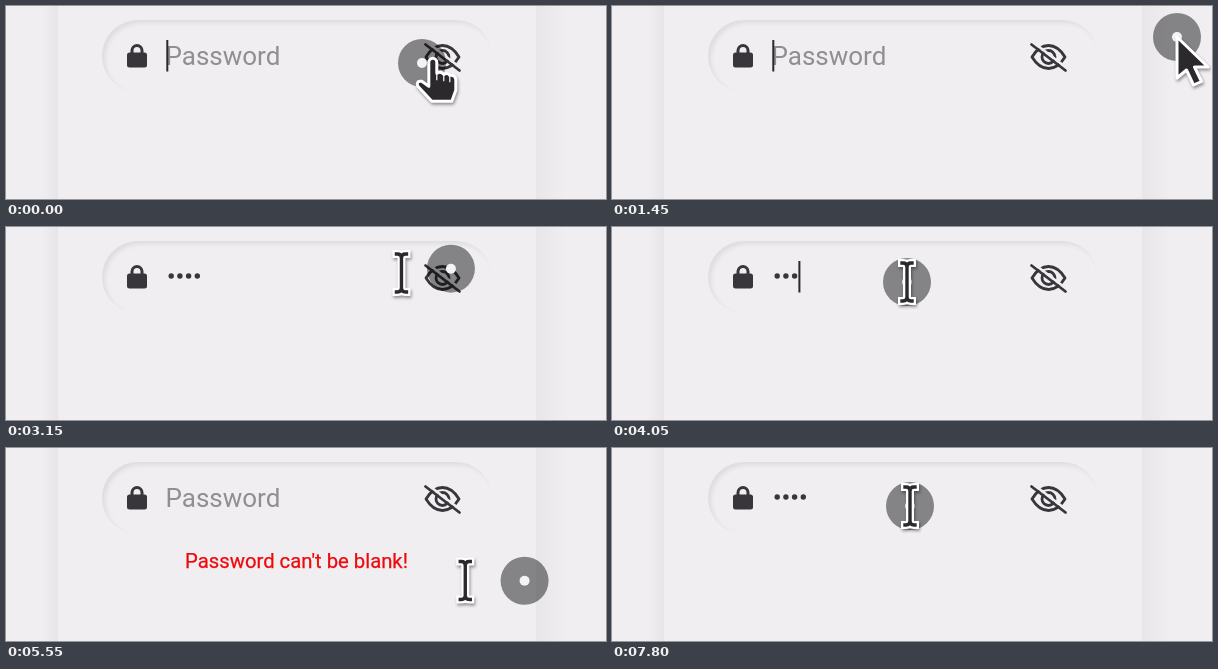
These frames come from a looping animation (600x193 px, 8 s). An HTML page:

```html
<!DOCTYPE html>
<html lang="en">
<head>
<meta charset="utf-8">
<title>Password field</title>
<style>
  html, body { margin: 0; width: 100%; height: 100%; overflow: hidden; background: #f0eef1; }
  #stage { position: relative; width: 600px; height: 193px; overflow: hidden; }
  #stage > * { position: absolute; }
  .edge { top: 0; height: 193px; }
  .left { left: 36px; width: 16px; background: linear-gradient(to right, #e7e5e800, #e7e5e8); }
  .right { left: 530px; width: 30px; background: linear-gradient(to right, #e8e6e9, #e8e6e900); }
  .field {
    left: 96px; top: 14px; width: 390px; height: 72px; border-radius: 36px;
    box-shadow: inset 3px 3px 4px #dedcdf, inset -3px -3px 6px #f1eff2;
  }
  svg { left: 0; top: 0; }
  .roboto { font-family: Roboto, sans-serif; }
  .pointer { filter: drop-shadow(1px 2px 1.5px #0006); }
  .solid { fill: #2b292c; stroke: #fff; stroke-width: 3; stroke-linejoin: round; }
</style>
</head>
<body>
<div id="stage">
  <div class="edge left"></div>
  <div class="edge right"></div>
  <div class="field"></div>
  <svg width="600" height="193" viewBox="0 0 600 193">
    <defs>
      <path id="beamShape" d="M-5-19H-4Q0-19 0-15Q0-19 4-19H5M0-16V16M-5 19H-4Q0 19 0 15Q0 19 4 19H5"/>
    </defs>

    <!-- lock -->
    <g fill="#38353b">
      <rect x="121" y="46.500" width="20" height="15" rx="2.5"/>
      <path d="M126 48V44.500a5 5 0 0 1 10 0V48" fill="none" stroke="#38353b" stroke-width="3"/>
    </g>
    <!-- crossed-out eye -->
    <g fill="none" stroke="#38353b" stroke-width="2.8" stroke-linecap="round">
      <path d="M420 51Q427 39.500 436.500 39.500T453 51Q446 62.500 436.500 62.500T420 51Z" stroke-linejoin="round"/>
      <circle cx="436.500" cy="51" r="6.500"/>
      <path d="M421.500 36.500L456 63" stroke="#f0eef1"/>
      <path d="M419.500 38.500L453.500 64.500"/>
    </g>

    <text id="hint" class="roboto" x="159.500" y="58.700" font-size="26" fill="#908e91">Password</text>
    <g id="bullets" fill="#38353b"></g>
    <rect id="caret" y="34" width="2" height="31.500" fill="#2b292d"/>

    <g id="disc">
      <circle r="24" fill="#000" fill-opacity=".45"/>
      <circle r="5" fill="#f5f3f6"/>
    </g>
    <text id="error" class="roboto" x="179" y="120" font-size="20.3" fill="#ee0a0c" stroke="#ee0a0c" stroke-width=".25">Password can't be blank!</text>

    <g id="popup">
      <rect x="95" y="85" width="391" height="48" rx="5.500" fill="#1d1b1e"/>
      <rect x="97" y="87" width="387" height="40.500" rx="3" fill="#5a595b"/>
      <text x="231" y="115" font-size="13.6" fill="#f0f0f0" font-family="'Noto Sans', sans-serif">View Saved Logins</text>
    </g>

    <g id="hand" class="pointer">
      <path class="solid" d="M3 0a4 4 0 0 1 8 0V11q4-3 7 1q4-2 6 1q5-1 6 4V28L26 39H6L-8 24q-2-6 4-5L3 24Z"/>
      <path d="M11 11V18M18 12V19M24 13V20" stroke="#fff" stroke-width="1.2"/>
    </g>
    <g id="arrow" class="pointer">
      <path class="solid" d="M0 0V41L9.500 33L16.500 48L24.500 44.500L17.500 30H31Z"/>
    </g>
    <g id="beam" class="pointer" fill="none" stroke-linecap="square">
      <use href="#beamShape" stroke="#fff" stroke-width="8"/>
      <use href="#beamShape" stroke="#2b292c" stroke-width="3.4"/>
    </g>
  </svg>
</div>
<script>
const LOOP = 8000, LAG = 80;
const $ = id => document.getElementById(id);

// each move eases from wherever the disc was: begin, end, x, y
const home = [416, 57];
const moves = [
  [0, 850, 565, 31],
  [2850, 3500, 295, 55],
  [4900, 5050, 198, 88],
  [5050, 5130, 309, 73],
  [5130, 5430, 566, 133],
  [5430, 5800, 377, 132],
  [6050, 6450, 298, 58]
];
const caretOn = [[0, 700], [1400, 2600], [3200, 3800], [4050, 4600], [7350, 7800]];

const clamp = (v, max) => Math.min(Math.max(v, 0), max);
const smooth = u => u * u * (3 - 2 * u);
const within = (t, [from, to]) => t >= from && t < to;
const show = (el, on) => el.style.display = on ? '' : 'none';
const place = (el, [x, y]) => el.setAttribute('transform', `translate(${x} ${y})`);

const position = t => moves.reduce(([px, py], [begin, end, x, y]) => {
  const k = smooth(clamp((t - begin) / (end - begin), 1));
  return [px + (x - px) * k, py + (y - py) * k];
}, home);

// four key presses at a steady rate
const presses = (t, first, gap) => clamp(Math.floor((t - first) / gap) + 1, 4);
const typed = t => presses(t, 1500, 180) - presses(t, 4050, 150) + presses(t, 7350, 100);

function pointerKind(t, x) {
  if (t < 300) return 'hand';
  if (t < 700) return '';
  return x > 486 ? 'arrow' : 'beam';
}

for (let i = 0; i < 4; i++)
  $('bullets').innerHTML += `<circle cx="${165.2 + 8.7 * i}" cy="49" r="2.7"/>`;

function draw(t) {
  const count = typed(t);
  [...$('bullets').children].forEach((bullet, i) => show(bullet, i < count));
  show($('hint'), !count);
  show($('caret'), caretOn.some(span => within(t, span)));
  $('caret').setAttribute('x', 160.3 + 8.7 * count);
  show($('popup'), within(t, [4550, 5430]));
  show($('error'), within(t, [4550, 7350]));

  place($('disc'), position(t));
  const tip = position(t + LAG);
  const kind = pointerKind(t, tip[0]);
  for (const id of ['hand', 'arrow', 'beam']) {
    show($(id), id === kind);
    place($(id), tip);
  }
}

const start = performance.now();
function frame() {
  draw((performance.now() - start) % LOOP);
  requestAnimationFrame(frame);
}
frame();
</script>
</body>
</html>
```
